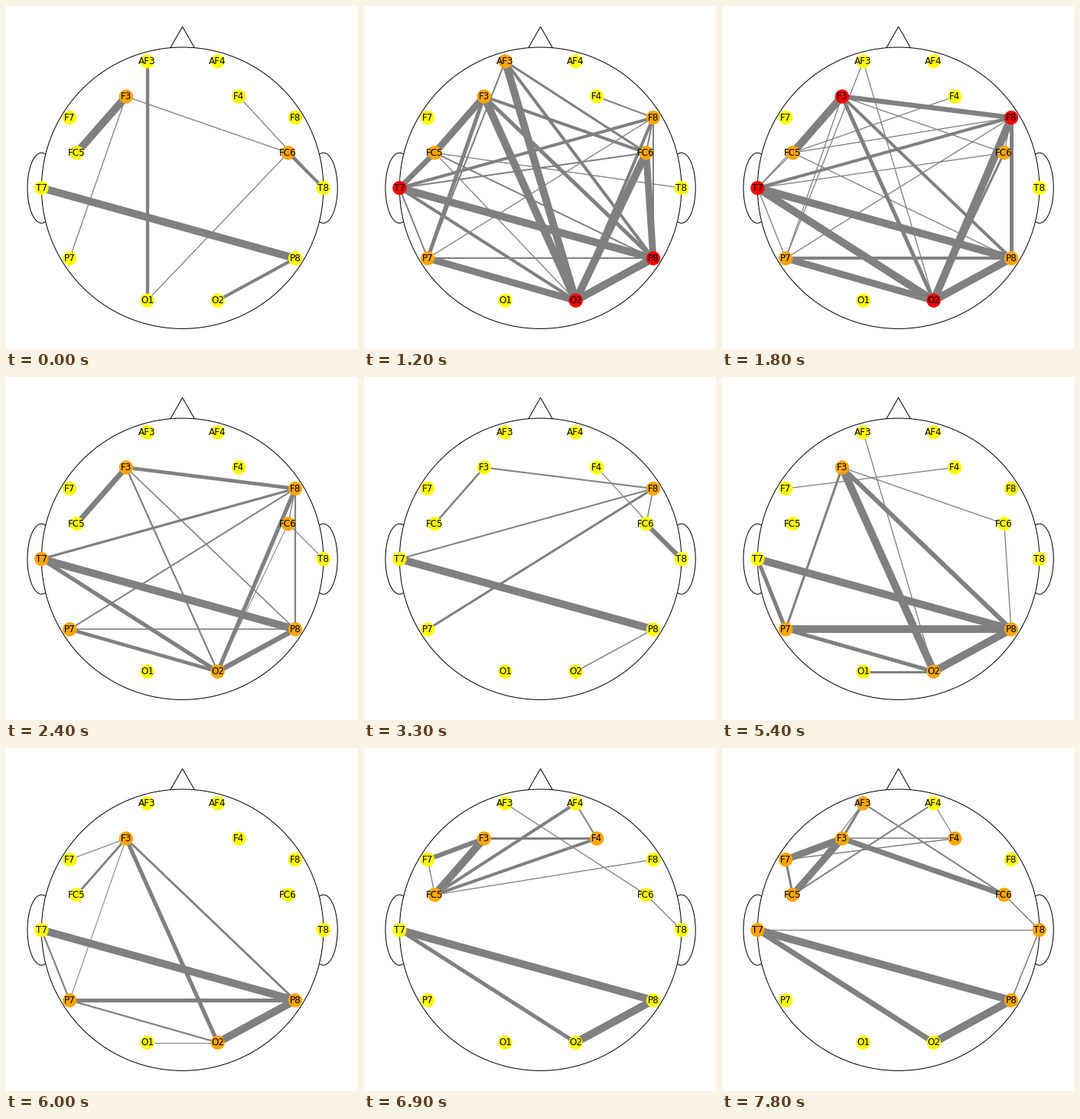
Recreate the animation shown at these times as a matplotlib script. Size 460 px wide and 449 px high, loop 8 s.

```python
import numpy as np
import matplotlib.pyplot as plt
from matplotlib.animation import FuncAnimation
from matplotlib.collections import LineCollection
from matplotlib.patches import Circle, Ellipse, Polygon

W, H, DPI = 460, 449, 64
PX = 72 / DPI                  # points per pixel
CX, CY, R = 230.6, 238.2, 184.2
INTERVAL, HOLD, FRAMES = 100, 3, 80
ABSENT, VISIBLE = -2.0, 0.8    # level of a missing link, thinnest drawn link

# Electrode positions in head radii, y upwards
LEFT = {"AF3": (-.25, .9), "F3": (-.4, .65), "F7": (-.8, .5), "FC5": (-.75, .25),
        "T7": (-1, 0), "P7": (-.8, -.5), "O1": (-.25, -.8)}
RIGHT = dict(zip(("AF4", "F4", "F8", "FC6", "T8", "P8", "O2"),
                 ((-x, y) for x, y in LEFT.values())))
POS = {name: (CX + R * x, CY - R * y) for name, (x, y) in {**LEFT, **RIGHT}.items()}

# Step number -> {link width in pixels: links}
KEYS = {
    0: {10: "F3-FC5 T7-P8", 4.3: "AF3-O1", 4: "P8-O2 FC6-T8",
        1.3: "F3-P7 F3-FC6 FC6-O1 F4-T8"},
    4: {10: "AF3-O2 F3-O2 FC6-O2 T7-P8 P8-O2", 9: "F3-FC5 P7-O2 FC6-P8", 7: "FC5-T7",
        5: "F3-P7 F3-P8", 4: "AF3-P8 F3-FC6 F8-T7 F8-O2 T7-O2", 3: "AF3-FC6",
        2: "AF3-P7 F4-F8 F8-P8 F8-FC6 FC5-P8 FC6-T7 T7-P7 P7-P8",
        1.3: "F8-P7 FC5-T8 FC5-O2 F3-T7"},
    6: {10: "F3-FC5 F8-O2 T7-P8 T7-O2 P8-O2", 9: "P7-O2", 6.5: "F3-F8",
        5: "F3-O2 F8-P8", 4: "F3-P8 F8-T7 P7-P8", 3: "FC6-O2",
        1.3: "AF3-P7 AF3-O2 F3-P7 F3-FC6 F3-T7 FC5-T7 F4-FC5 F8-FC5 F8-P7 "
             "F8-FC6 FC5-P8 FC6-T7 T7-P7"},
    11: {10: "T7-P8", 6: "FC6-T8", 3: "F8-P7", 2.5: "F3-FC5", 2: "F3-F8 F8-T7",
         1.5: "F8-FC6 P8-O2", 1.2: "F4-T8"},
    18: {10: "F3-O2 T7-P8 P7-P8 P8-O2", 6: "F3-P8", 5: "T7-P7 P7-O2", 3: "F3-P7 O1-O2",
         1.3: "F7-F4 AF3-O2 F3-FC6 FC6-P8"},
    23: {10: "F3-FC5 T7-P8 P8-O2", 6: "F3-F7", 5: "T7-O2", 4: "AF4-FC5 F4-FC5",
         3: "F3-F4", 2: "AF4-F4", 1.3: "F7-FC5 FC5-F8 AF3-FC6 FC6-T8"},
    26: {10: "T7-P8 P8-O2", 9: "F3-F7 F3-FC5", 7: "F3-FC6 T7-O2", 3: "AF3-F3 F7-FC5",
         2: "AF4-FC5 AF3-FC6", 1.5: "F3-F4 FC6-T8 T8-P8 F7-F4",
         1.2: "AF3-FC5 AF4-F4 T7-T8"},
}


def read_levels():
    levels = {}
    for row, groups in enumerate(KEYS.values()):
        for width, links in groups.items():
            for link in links.split():
                pair = tuple(sorted(link.split("-")))
                levels.setdefault(pair, np.full(len(KEYS), ABSENT))[row] = width
    return levels


LEVELS = read_levels()


def node_color(degree):
    return "red" if degree >= 7 else "orange" if degree >= 3 else "yellow"


fig = plt.figure(figsize=(W / DPI, H / DPI), dpi=DPI, facecolor="white")
ax = fig.add_axes([0, 0, 1, 1])
ax.set(xlim=(0, W), ylim=(H, 0))
ax.axis("off")

outline = dict(fc="white", ec="black", lw=PX)
for side in (-1, 1):
    ax.add_patch(Ellipse((CX + side * R, CY), 0.2 * R, 0.5 * R, zorder=1, **outline))
ax.add_patch(Polygon([(CX - 16.5, 56), (CX, 27), (CX + 16.5, 56)], zorder=1, **outline))
ax.add_patch(Circle((CX, CY), R, zorder=2, **outline))

links = LineCollection([], colors="gray", zorder=3)
ax.add_collection(links)
nodes = {}
for name, (x, y) in POS.items():
    nodes[name] = ax.add_patch(Circle((x, y), 9.2, lw=0, zorder=4))
    ax.text(x, y, name, family="DejaVu Sans", size=12 * PX,
            ha="center", va="center", zorder=5)


def draw(frame):
    step = frame // HOLD
    degree = dict.fromkeys(POS, 0)
    segments, widths = [], []
    for (a, b), levels in LEVELS.items():
        width = np.interp(step, list(KEYS), levels)
        if width >= VISIBLE:
            segments.append((POS[a], POS[b]))
            widths.append(width * PX)
            degree[a] += 1
            degree[b] += 1
    links.set_segments(segments)
    links.set_linewidths(widths)
    for name, node in nodes.items():
        node.set_facecolor(node_color(degree[name]))
    return [links, *nodes.values()]


anim = FuncAnimation(fig, draw, frames=FRAMES, interval=INTERVAL, repeat=True, repeat_delay=0)
plt.show()
```
